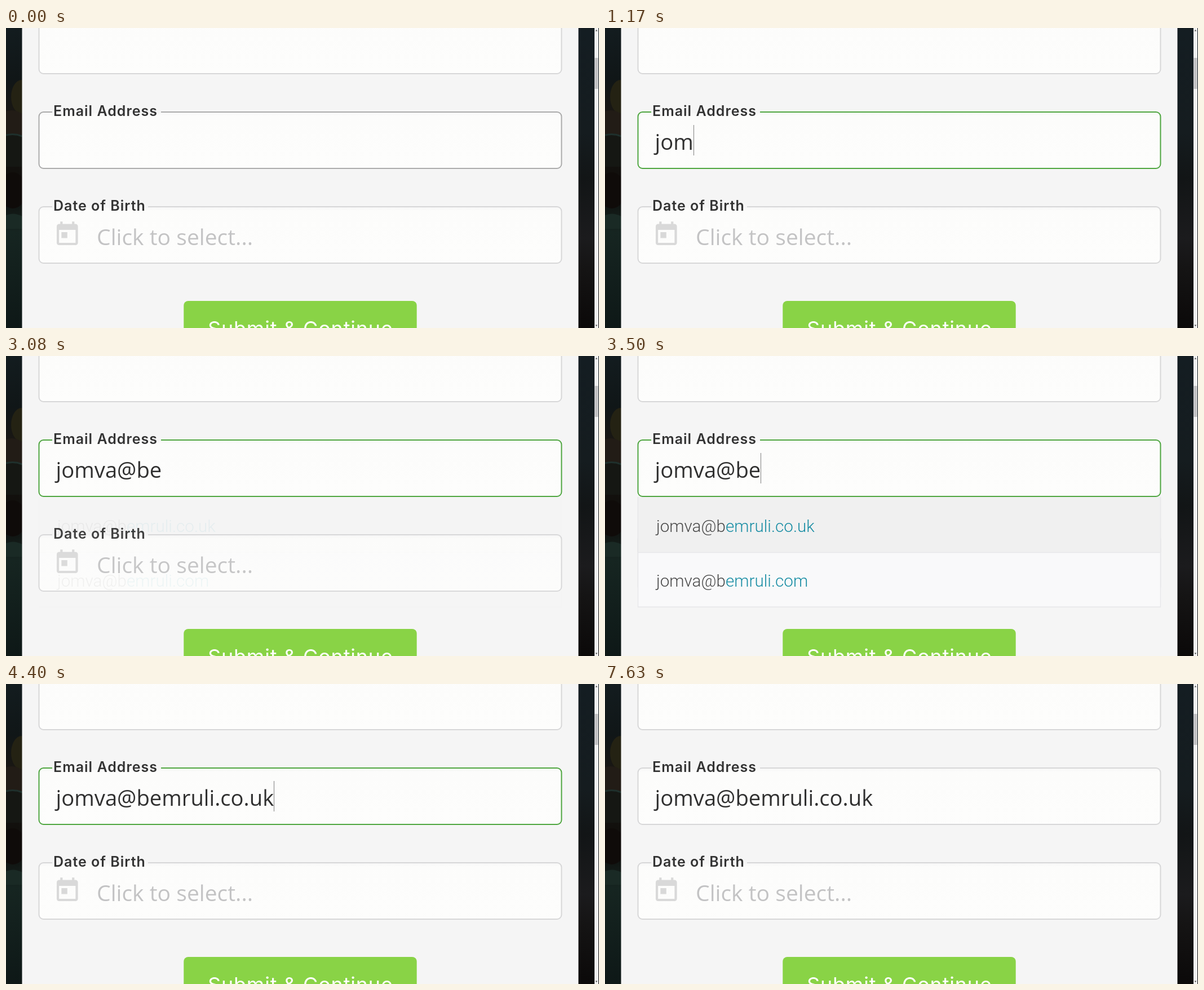
These frames come from a looping animation (1052 px wide and 532 px high, 8.54 s). An HTML page:

```html
<!DOCTYPE html>
<html lang="en">
<head>
<meta charset="utf-8">
<title>Email autocomplete</title>
<style>
  html, body { margin: 0; width: 100%; height: 100%; overflow: hidden; background: #f5f5f5; }
  svg { display: block; width: 100%; height: 100%; }
  text { white-space: pre; }
  .field { fill: url(#inset); stroke: #d7d7d8; stroke-width: 2; }
  .label { font: 600 25px Inter, sans-serif; letter-spacing: 1px; fill: #333; }
  .input { font: 38.2px "Open Sans", sans-serif; fill: #303030; }
  .placeholder { font-size: 39.1px; fill: #c3c3c4; }
  .row { font: 350 29.6px Roboto, sans-serif; fill: #484848; }
  .row tspan { fill: #168ca3; }
  .button { font: 36px Inter, sans-serif; letter-spacing: .8px; fill: #fff; }
</style>
</head>
<body>
<svg viewBox="0 0 1052 532">
  <defs>
    <linearGradient id="inset" x2="0" y2="1">
      <stop stop-color="#f6f6f6"/><stop offset=".07" stop-color="#fcfcfb"/><stop offset="1" stop-color="#fdfdfc"/>
    </linearGradient>
    <linearGradient id="leftTone" x2="0" y2="1">
      <stop stop-color="#131c1f"/><stop offset=".17" stop-color="#101617"/><stop offset=".3" stop-color="#1b1712"/>
      <stop offset=".55" stop-color="#0e0d0b"/><stop offset=".68" stop-color="#162521"/><stop offset="1" stop-color="#0e1817"/>
    </linearGradient>
    <linearGradient id="rightTone" x2="0" y2="1">
      <stop stop-color="#141d22"/><stop offset=".35" stop-color="#151c1f"/><stop offset=".5" stop-color="#121516"/>
      <stop offset=".7" stop-color="#1b1b1d"/><stop offset=".8" stop-color="#151414"/><stop offset="1" stop-color="#0b0909"/>
    </linearGradient>
    <clipPath id="leftClip"><path d="M0 0H29V532H0z"/></clipPath>
  </defs>

  <!-- blurred backdrop beside the panel -->
  <path fill="url(#leftTone)" d="M0 0H29V532H0z"/>
  <g clip-path="url(#leftClip)">
    <ellipse cx="28" cy="122" rx="19" ry="30" fill="#242213"/>
    <ellipse cx="10" cy="172" rx="28" ry="26" fill="#221c16"/>
    <path d="M0 190Q14 186 29 192V246H0z" fill="#151713"/>
    <path d="M0 190Q14 186 29 192" fill="none" stroke="#1f302c" stroke-width="3"/>
    <ellipse cx="12" cy="288" rx="24" ry="32" fill="#0f0b09"/>
    <path d="M0 332Q14 326 29 334V356H0z" fill="#1a2a25"/>
  </g>
  <path fill="url(#rightTone)" d="M1015 0H1052V532H1015z"/>
  <path fill="#f5f5f5" d="M28.5 0H1015.5V532H28.5z"/>

  <!-- scrollbar -->
  <path fill="#f1f1f1" d="M1044 0H1051V532H1044z"/>
  <path fill="#c1c1c3" d="M1044.5 53H1050.5V108H1044.5z"/>
  <path fill="#505050" d="M1045.5 5.5L1047.5 3L1049.5 5.5zM1045.5 526.5L1047.5 529L1049.5 526.5z"/>

  <!-- form -->
  <rect class="field" x="58.5" y="-20" width="927" height="101" rx="8"/>
  <rect class="field" id="emailField" x="58.5" y="149" width="927" height="100" rx="8"/>
  <path fill="#f5f5f5" d="M82 147H275V150.5H82z"/>
  <text class="label" x="84" y="156">Email Address</text>
  <text class="input" id="emailText" x="88.5" y="216"></text>
  <path id="caret" d="M0 172V226" stroke="#808080"/>

  <rect class="field" id="birthField" x="58.5" y="317" width="927" height="100" rx="8"/>
  <path fill="#f5f5f5" d="M82 315H252V318.5H82z"/>
  <text class="label" x="84" y="324">Date of Birth</text>
  <path fill="#d9d9d9" transform="translate(83.7 341.2) scale(2.09)" d="M19 3h-1V1h-2v2H8V1H6v2H5c-1.1 0-2 .9-2 2v14c0 1.1.9 2 2 2h14c1.1 0 2-.9 2-2V5c0-1.1-.9-2-2-2zm0 16H5V8h14zM7 10h5v5H7z"/>
  <text class="input placeholder" x="161" y="384.5">Click to select...</text>

  <rect x="315.3" y="484" width="413.4" height="80" rx="8" fill="#89d346"/>
  <text class="button" x="358" y="545.5">Submit &amp; Continue</text>

  <!-- suggestions -->
  <g id="menu">
    <path id="firstRow" d="M57.5 250H986.5V348H57.5z"/>
    <path id="secondRow" d="M57.5 348H986.5V445H57.5z"/>
    <path fill="none" stroke="#e7e7e9" stroke-width="1.5" d="M58.5 250V445H985.5V250M58 348.5H986"/>
    <text class="row" x="91" y="312">jomva@b<tspan>emruli.co.uk</tspan></text>
    <text class="row" x="91" y="409">jomva@b<tspan>emruli.com</tspan></text>
  </g>
</svg>
<script>
const LOOP = 8540;
const ADDRESS = 'jomva@bemruli.co.uk';
const TEXT_X = 88.5;
const KEY_TIMES = [940, 1020, 1170, 1270, 1350, 1940, 2250, 2390];
const FOCUS = 200, CHOOSE = 4400, BLUR = 6720, BLINK = 530;
const CARET_RESETS = [FOCUS, ...KEY_TIMES, CHOOSE];

const GREY = [215, 215, 216], HOVER = [171, 171, 171], GREEN = [79, 166, 64];
const ROW_IDLE = [250, 250, 251], ROW_ACTIVE = [239, 239, 239];

const [emailField, emailText, caret, birthField, menu, firstRow, secondRow] =
  ['emailField', 'emailText', 'caret', 'birthField', 'menu', 'firstRow', 'secondRow']
    .map(id => document.getElementById(id));

// Smooth 0..1 progress between two times
function ramp(t, start, end) {
  const p = Math.min(1, Math.max(0, (t - start) / (end - start)));
  return p * p * (3 - 2 * p);
}
const mix = (a, b, p) => `rgb(${a.map((v, i) => Math.round(v + (b[i] - v) * p))})`;

function draw(t) {
  const typed = KEY_TIMES.filter(k => k <= t).length;
  emailText.textContent = t < CHOOSE ? ADDRESS.slice(0, typed) : ADDRESS;
  emailField.style.stroke = t < BLUR ? mix(HOVER, GREEN, ramp(t, 80, 480)) : `rgb(${GREY})`;

  const lastReset = Math.max(...CARET_RESETS.filter(r => r <= t));
  const lit = Math.floor((t - lastReset) / BLINK) % 2 === 0;
  caret.style.display = t >= FOCUS && t < BLUR && lit ? '' : 'none';
  const caretX = TEXT_X + (typed ? emailText.getComputedTextLength() : 0);
  caret.setAttribute('transform', `translate(${Math.round(caretX) + .5})`);

  menu.style.opacity = t < CHOOSE ? ramp(t, 3040, 3300) : 0;
  const second = ramp(t, 3460, 3670) - ramp(t, 3910, 4110);
  firstRow.style.fill = mix(ROW_ACTIVE, ROW_IDLE, second);
  secondRow.style.fill = mix(ROW_IDLE, ROW_ACTIVE, second);

  const birthHover = ramp(t, 4960, 5160) - ramp(t, 5320, 5540);
  birthField.style.stroke = mix(GREY, HOVER, birthHover);
}

const begin = performance.now();
function tick() {
  draw((performance.now() - begin) % LOOP);
  requestAnimationFrame(tick);
}
tick();
</script>
</body>
</html>
```
